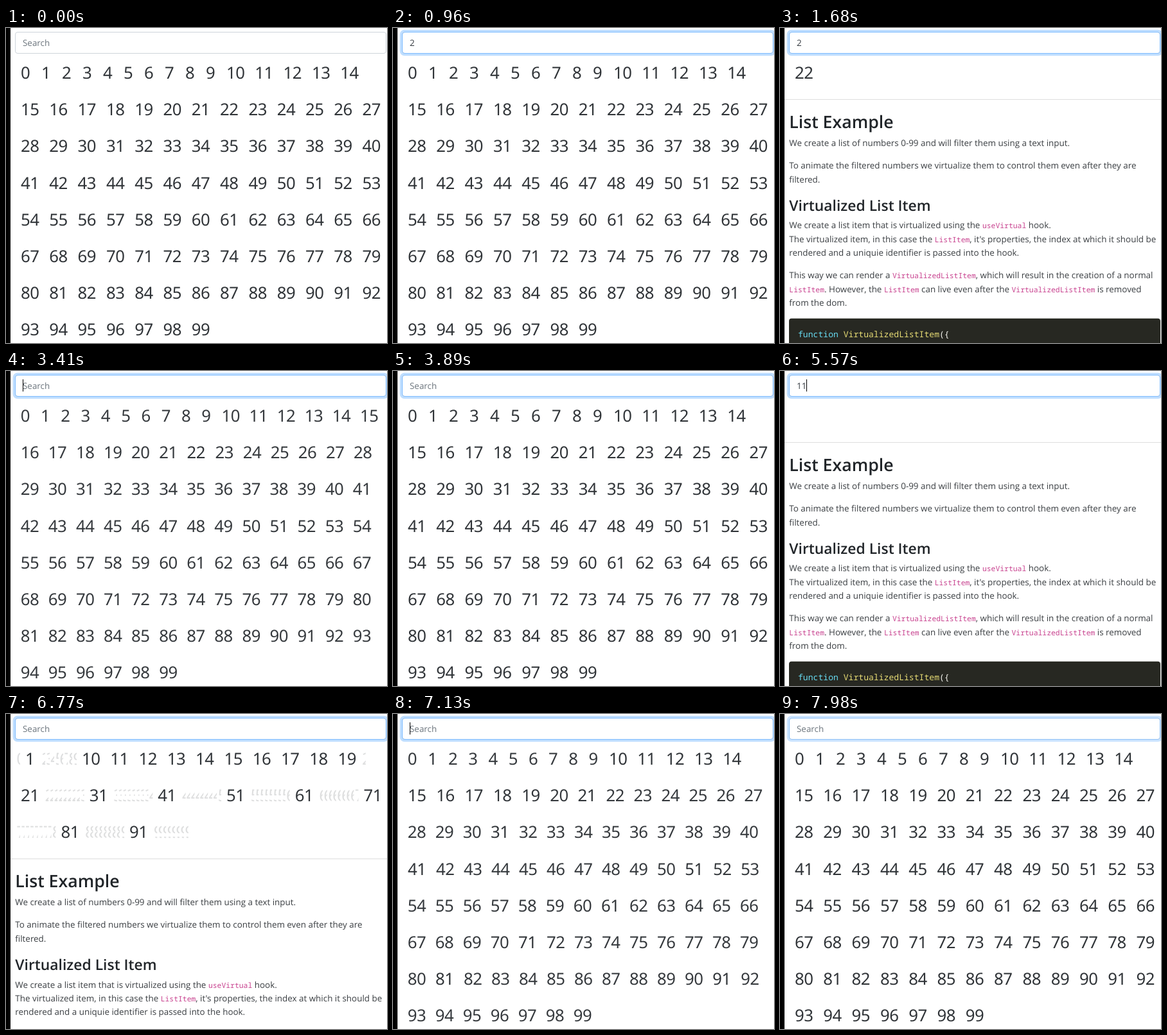
An HTML page for the animation above (8.1 s loop, 593 by 491 pixels).

```html
<!DOCTYPE html>
<html lang="en">
<head>
<meta charset="utf-8">
<title>Filtered number list</title>
<style>
  html, body { margin: 0; width: 100%; height: 100%; overflow: hidden; background: #fff; }
  #stage { display: block; width: 593px; height: 491px; font-family: "Open Sans", "Noto Sans", sans-serif; }
  text { fill: #3a3e42; font-size: 13.42px; white-space: pre; text-rendering: geometricPrecision; }
  .num { font-family: "Noto Sans", "Open Sans", sans-serif; font-size: 25.8px; letter-spacing: -.5px; fill: #303438; }
  .h2 { font-size: 26.7px; font-weight: 600; fill: #212529; }
  .h3 { font-size: 22.9px; font-weight: 600; fill: #212529; }
  .code { font: 11.4px "Noto Sans Mono", "DejaVu Sans Mono", monospace; fill: #c8428f; }
  .block { font: 500 13.1px "Noto Sans Mono", "DejaVu Sans Mono", monospace; fill: #f8f8f2; }
  .key { fill: #66d9ef; }
  .name { fill: #e6db74; }
</style>
</head>
<body>
<svg id="stage" viewBox="0 0 593 491">
  <rect width="593" height="491" fill="#fff"/>
  <g id="article">
    <rect x="7" y="110.9" width="586" height="1" fill="#dcdcdc"/>
  </g>
  <g id="list"></g>
  <rect id="ring" x="12.4" y="4.4" width="581.4" height="37.2" rx="5.5" fill="none" stroke="#bfdeff" stroke-width="3.4"/>
  <rect x="14.5" y="6.5" width="577" height="33" rx="3.5" fill="#fff" stroke="#ced4da"/>
  <rect id="border" x="14.5" y="6.5" width="577" height="33" rx="3.5" fill="none" stroke="#80bdff"/>
  <text id="field" x="26" y="28"></text>
  <rect id="caret" y="13" width="1" height="19" fill="#000"/>
  <rect width="7" height="491" fill="#000"/>
</svg>
<script>
const LOOP = 8100, LAG = 70;
const LEFT = 15, WIDTH = 578.5, ROW = 57.2;

// time, field text, filter (when it differs from the text)
const TYPED = [
  [900, "2"], [980, "22"], [1640, "2", "22"], [2920, ""],
  [3900, "1"], [4384, "11"], [4860, "111"], [5540, "11"],
  [5830, "1"], [6646, ""]
];

// baseline, class, text; backticks mark inline code
const LINES = [
  [155.5, "h2", "List Example"],
  [184, "", "We create a list of numbers 0-99 and will filter them using a text input."],
  [219, "", "To animate the filtered numbers we virtualize them to control them even after they are"],
  [240.5, "", "filtered."],
  [284.5, "h3", "Virtualized List Item"],
  [312.3, "", "We create a list item that is virtualized using the `useVirtual` hook."],
  [333.7, "", "The virtualized item, in this case the `ListItem`, it's properties, the index at which it should be"],
  [355, "", "rendered and a uniquie identifier is passed into the hook."],
  [390.3, "", "This way we can render a `VirtualizedListItem`, which will result in the creation of a normal"],
  [411.7, "", "`ListItem`. However, the `ListItem` can live even after the `VirtualizedListItem` is removed"],
  [433, "", "from the dom."]
];

const $ = id => document.getElementById(id);

function add(parent, tag, attrs, text = "") {
  const el = document.createElementNS("http://www.w3.org/2000/svg", tag);
  for (const k in attrs) el.setAttribute(k, attrs[k]);
  el.textContent = text;
  return parent.appendChild(el);
}

const article = $("article");
for (const [y, cls, text] of LINES) {
  const line = add(article, "text", { x: 14.3, y, class: cls });
  text.split("`").forEach((part, i) => {
    if (part) add(line, "tspan", i % 2 ? { class: "code" } : {}, part);
  });
}
add(article, "rect", { x: 14, y: 452.8, width: 578, height: 80, rx: 4, fill: "#272822" });
const code = add(article, "text", { x: 28, y: 482, class: "block" });
add(code, "tspan", { class: "key" }, "function ");
add(code, "tspan", { class: "name" }, "VirtualizedListItem");
add(code, "tspan", {}, "({");

const items = Array.from({ length: 100 }, (_, n) => {
  const box = add($("list"), "svg", { height: 44, overflow: "hidden" });
  return { n, box, label: add(box, "text", { y: 28, class: "num" }, n) };
});

// Critically damped spring: share of the way still to go
function rest(ms) {
  const x = 0.013 * ms;
  return Math.exp(-x) * (1 + x);
}

function presence(n, t) {
  let goal = 1, from = 1, since = 0;
  const value = at => goal + (from - goal) * rest(at - since);
  for (const [time, text, filter = text] of TYPED) {
    const at = time + LAG;
    if (at > t) break;
    const next = String(n).includes(filter) ? 1 : 0;
    if (next !== goal) {
      from = value(at);
      goal = next;
      since = at;
    }
  }
  const v = value(t);
  return goal === 0 && v < 0.01 ? 0 : v;
}

function layout(t) {
  let x = 0, row = 0;
  for (const { n, box, label } of items) {
    const p = presence(n, t);
    box.style.display = p ? "" : "none";
    if (!p) continue;
    const w = n < 10 ? 32 * p ** 0.82 : 44.3 * p;
    if (x + w > WIDTH) {
      x = 0;
      row++;
    }
    box.setAttribute("x", LEFT + x);
    box.setAttribute("y", 51 + ROW * row);
    box.setAttribute("width", w);
    label.setAttribute("x", 8 * p);
    label.setAttribute("opacity", p);
    x += w;
  }
  article.setAttribute("transform", `translate(0 ${ROW * row})`);
}

function drawField(t) {
  let text = "";
  for (const [at, s] of TYPED) if (at <= t) text = s;
  const field = $("field");
  field.textContent = text || "Search";
  field.style.fill = text ? "#343a40" : "#6c757d";

  const focus = t >= 7980 ? 0.8 : Math.min(1, Math.max(0, (t - 300) / 150));
  $("ring").setAttribute("opacity", focus);
  $("border").setAttribute("opacity", focus);

  const blink = (t - 2050 + 3 * 1007) % 1007;
  $("caret").setAttribute("x", 26 + Math.round(7.6 * text.length));
  $("caret").style.display = focus > 0 && blink < 500 ? "" : "none";
}

// The picture steps every 120 ms, with a few longer holds
function step(t) {
  if (t >= 7980) return 7980;
  if (t >= 3170) return Math.min(7730, 3170 + Math.floor((t - 3170) / 120) * 120);
  for (const hold of [2920, 2550, 2050]) if (t >= hold) return hold;
  return Math.min(1680, Math.floor(t / 120) * 120);
}

let shown = -1;
function draw() {
  const t = step(performance.now() % LOOP);
  if (t !== shown) {
    shown = t;
    layout(t);
    drawField(t);
  }
  requestAnimationFrame(draw);
}
draw();
</script>
</body>
</html>
```
